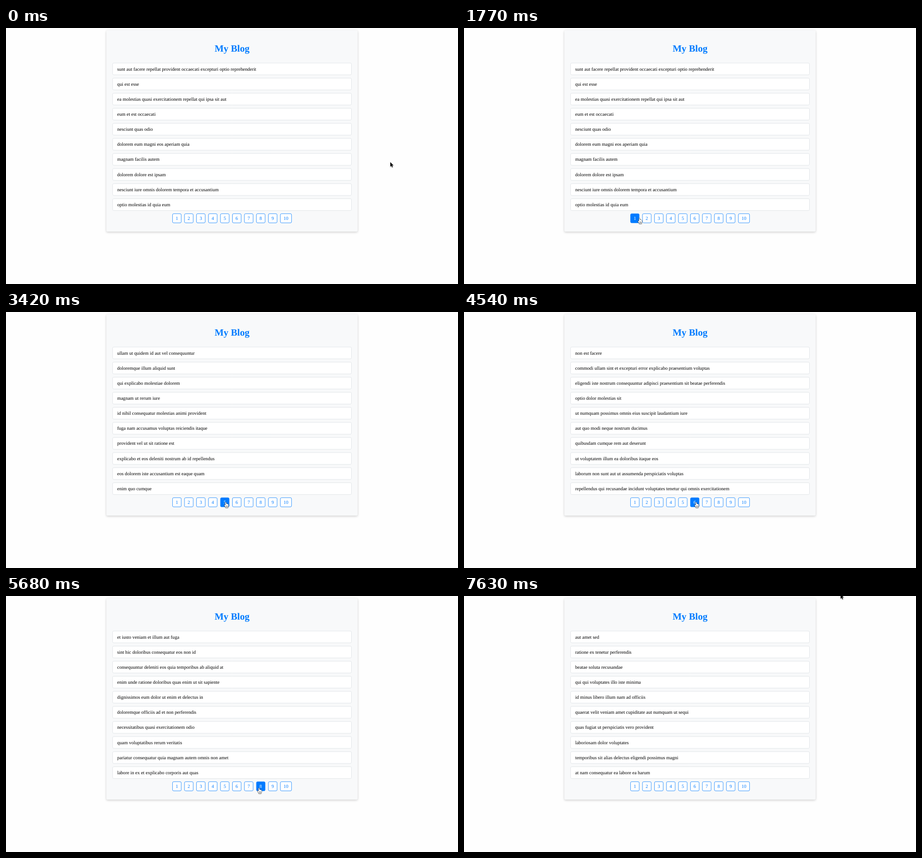
An HTML page with a canvas that plays this animation: 995 by 563 pixels, repeating every 8680 ms.

```html
<!DOCTYPE html>
<html lang="en">
<head>
<meta charset="utf-8">
<title>My Blog</title>
<style>
html, body { margin: 0; width: 100%; height: 100%; overflow: hidden; background: #fefefe; }
canvas { display: block; }
</style>
</head>
<body>
<canvas id="stage" width="995" height="563"></canvas>
<script>
const ctx = document.getElementById('stage').getContext('2d');
const LOOP = 8680;
const UNIT = 0.66; // the page is shown at two thirds of its layout size
const BLUE = '#007bff';

const pages = `sunt aut facere repellat provident occaecati excepturi optio reprehenderit
qui est esse
ea molestias quasi exercitationem repellat qui ipsa sit aut
eum et est occaecati
nesciunt quas odio
dolorem eum magni eos aperiam quia
magnam facilis autem
dolorem dolore est ipsam
nesciunt iure omnis dolorem tempora et accusantium
optio molestias id quia eum

et ea vero quia laudantium autem
in quibusdam tempore odit est dolorem
dolorum ut in voluptas mollitia et saepe quo animi
voluptatem eligendi optio
eveniet quod temporibus
sint suscipit perspiciatis velit dolorum rerum ipsa laboriosam odio
fugit voluptas sed molestias voluptatem provident
voluptate et itaque vero tempora molestiae
adipisci placeat illum aut reiciendis qui
doloribus ad provident suscipit at

asperiores ea ipsam voluptatibus modi minima quia sint
dolor sint quo a velit explicabo quia nam
maxime id vitae nihil numquam
autem hic labore sunt dolores incidunt
rem alias distinctio quo quis
est et quae odit qui non
quasi id et eos tenetur aut quo autem
delectus ullam et corporis nulla voluptas sequi
iusto eius quod necessitatibus culpa ea
a quo magni similique perferendis

ullam ut quidem id aut vel consequuntur
doloremque illum aliquid sunt
qui explicabo molestiae dolorem
magnam ut rerum iure
id nihil consequatur molestias animi provident
fuga nam accusamus voluptas reiciendis itaque
provident vel ut sit ratione est
explicabo et eos deleniti nostrum ab id repellendus
eos dolorem iste accusantium est eaque quam
enim quo cumque

non est facere
commodi ullam sint et excepturi error explicabo praesentium voluptas
eligendi iste nostrum consequuntur adipisci praesentium sit beatae perferendis
optio dolor molestias sit
ut numquam possimus omnis eius suscipit laudantium iure
aut quo modi neque nostrum ducimus
quibusdam cumque rem aut deserunt
ut voluptatem illum ea doloribus itaque eos
laborum non sunt aut ut assumenda perspiciatis voluptas
repellendus qui recusandae incidunt voluptates tenetur qui omnis exercitationem

soluta aliquam aperiam consequatur illo quis voluptas
qui enim et consequuntur quia animi quis voluptate quibusdam
ut quo aut ducimus alias
sit asperiores ipsam eveniet odio non quia
sit vel voluptatem et non libero
qui et at rerum necessitatibus
sed ab est est
voluptatum itaque dolores nisi et quasi
qui commodi dolor at maiores et quis id accusantium
consequatur placeat omnis quisquam quia reprehenderit fugit veritatis facere

voluptatem doloribus consectetur est ut ducimus
beatae enim quia vel
voluptas blanditiis repellendus animi ducimus error sapiente et suscipit
et fugit quas eum in in aperiam quod
consequatur id enim sunt et et
repudiandae ea animi iusto
aliquid eos sed fuga est maxime repellendus
odio quis facere architecto reiciendis optio
fugiat quod pariatur odit minima
voluptatem laborum magni

et iusto veniam et illum aut fuga
sint hic doloribus consequatur eos non id
consequuntur deleniti eos quia temporibus ab aliquid at
enim unde ratione doloribus quas enim ut sit sapiente
dignissimos eum dolor ut enim et delectus in
doloremque officiis ad et non perferendis
necessitatibus quasi exercitationem odio
quam voluptatibus rerum veritatis
pariatur consequatur quia magnam autem omnis non amet
labore in ex et explicabo corporis aut quas

tempora rem veritatis voluptas quo dolores vero
laudantium voluptate suscipit sunt enim enim
odit et voluptates doloribus alias odio et
optio ipsam molestias necessitatibus occaecati facilis veritatis dolores aut
dolore veritatis porro provident adipisci blanditiis et sunt
placeat quia et porro iste
nostrum quis quasi placeat
sapiente omnis fugit eos
sint soluta et vel magnam aut ut sed qui
ad iusto omnis odit dolor voluptatibus

aut amet sed
ratione ex tenetur perferendis
beatae soluta recusandae
qui qui voluptates illo iste minima
id minus libero illum nam ad officiis
quaerat velit veniam amet cupiditate aut numquam ut sequi
quas fugiat ut perspiciatis vero provident
laboriosam dolor voluptates
temporibus sit alias delectus eligendi possimus magni
at nam consequatur ea labore ea harum`.split('\n\n').map(page => page.split('\n'));

// Times at which pages 2 to 10 open
const clicks = [1910, 2470, 3050, 3690, 4620, 5150, 5680, 6210, 6620];

// Pointer path: time, x, y
const path = [
  [0, 846, 295], [119, 846, 295], [120, 790, 335], [219, 760, 350], [220, 660, 392],
  [480, 660, 392], [630, 450, 414], [770, 440, 415], [1000, 386, 418], [1770, 386, 418],
  [1860, 405, 418], [2060, 405, 418], [2320, 430, 418.5], [2690, 430, 418.5],
  [2820, 457, 418.5], [3270, 457, 418.5], [3420, 484, 418], [3920, 484, 418],
  [4020, 508, 418], [4320, 508, 418], [4540, 511, 418], [4810, 511, 418],
  [5000, 535, 420], [5370, 535, 420], [5520, 557, 422], [5880, 557, 422],
  [6100, 587, 422], [6430, 587, 422], [6520, 614.5, 422], [7370, 614.5, 422],
  [7630, 829, -4], [LOOP, 829, -4]
];

const buttons = Array.from({ length: 10 }, (_, i) => ({
  label: String(i + 1), x: 366.2 + i * 26.38, y: 408.1, w: i < 9 ? 19.7 : 25.2, h: 20.7
}));

const arrow = new Path2D('M0 0V10L2.3 7.9L3.9 11.4L5.5 10.7L4 7.3H7.1Z');
const hand = new Path2D('M-1 1Q0 -.7 1 1V4Q2 3.3 2.8 4.3Q3.7 3.7 4.3 4.7Q5.6 4.3 5.7 6V8.5L4.7 10.8V12.3H-.7V11L-3.3 7.6Q-3.7 6 -2.1 6.3L-1 7.4Z');

function pointerAt(t) {
  const i = Math.max(1, path.findIndex(key => key[0] > t));
  const [t0, x0, y0] = path[i - 1], [t1, x1, y1] = path[i];
  const k = (t - t0) / (t1 - t0);
  return { x: x0 + (x1 - x0) * k, y: y0 + (y1 - y0) * k };
}

function box(x, y, w, h, r, fill, stroke, line) {
  ctx.beginPath();
  ctx.roundRect(x, y, w, h, r);
  ctx.fillStyle = fill;
  ctx.fill();
  if (!stroke) return;
  ctx.strokeStyle = stroke;
  ctx.lineWidth = line;
  ctx.stroke();
}

function text(str, x, y, size, color, align = 'left', weight = '') {
  ctx.save();
  ctx.translate(x, y);
  ctx.scale(UNIT, UNIT);
  ctx.font = `${weight} ${size}px "Liberation Serif", serif`;
  ctx.textRendering = 'geometricPrecision';
  ctx.textAlign = align;
  ctx.fillStyle = color;
  ctx.fillText(str, 0, 0);
  ctx.restore();
}

function drawCard() {
  ctx.save();
  ctx.shadowColor = 'rgba(0,0,0,.2)';
  ctx.shadowOffsetY = 1.6;
  ctx.shadowBlur = 5;
  box(221, 5, 553, 442.7, 2.6, '#f8f9fa');
  ctx.restore();
}

function drawPointer({ x, y }, over) {
  ctx.save();
  ctx.translate(x, y);
  ctx.lineJoin = 'round';
  const shape = over ? hand : arrow;
  ctx.shadowColor = 'rgba(0,0,0,.3)';
  ctx.shadowBlur = 1.5;
  ctx.shadowOffsetY = 0.7;
  ctx.lineWidth = over ? 1 : 1.2;
  ctx.strokeStyle = over ? '#000' : '#fff';
  ctx.stroke(shape);
  ctx.shadowColor = 'transparent';
  ctx.fillStyle = over ? '#fff' : '#000';
  ctx.fill(shape);
  if (over) {
    ctx.lineWidth = 0.6;
    ctx.stroke(new Path2D('M.5 8V10.5M2 8V10.5M3.5 8V10.5'));
  }
  ctx.restore();
}

function draw(t) {
  const pointer = pointerAt(t);
  const hovered = buttons.find(b => pointer.x >= b.x - 1 && pointer.x <= b.x + b.w + 1 &&
    pointer.y >= b.y && pointer.y <= b.y + b.h);
  const blue = t >= 6520 && t < 6620 ? '#3088e2' : BLUE;
  const page = clicks.filter(time => t >= time).length;

  ctx.fillStyle = '#fefefe';
  ctx.fillRect(0, 0, 995, 563);
  drawCard();
  text('My Blog', 497.6, 51.8, 32, blue, 'center', 'bold');
  pages[page].forEach((title, i) => {
    const y = 77 + i * 33.16;
    box(234.7, y, 525.8, 26, 2.6, '#fff', '#dee2e6', 0.9);
    text(title, 244.7, y + 16.5, 16, '#000');
  });
  for (const b of buttons) {
    const on = b === hovered;
    box(b.x + 0.4, b.y + 0.3, b.w - 0.6, b.h - 0.5, 2.6, on ? blue : '#fff', blue, 0.8);
    text(b.label, b.x + b.w / 2, 422, 16, on ? '#fff' : blue, 'center');
  }
  drawPointer(pointer, hovered);
}

const start = performance.now();
function tick() {
  draw((performance.now() - start) % LOOP);
  requestAnimationFrame(tick);
}
tick();
</script>
</body>
</html>
```
